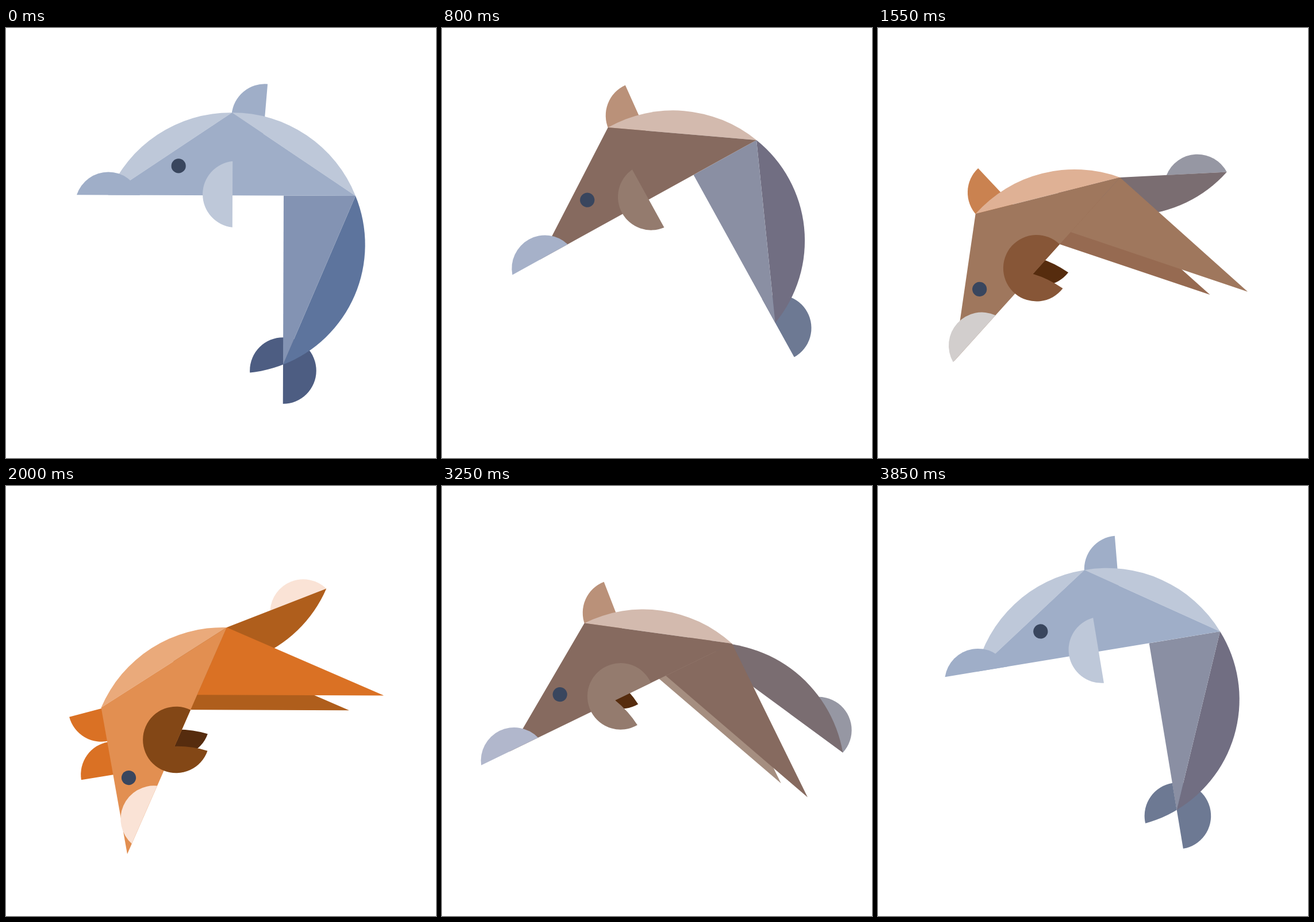
Recreate the animation shown at these times as an HTML page with a canvas. Size 748x748 px, loop 4000 ms.

```html
<!DOCTYPE html>
<html lang="en">
<head>
<meta charset="utf-8">
<title>Dolphin to fox</title>
<style>
  html, body { margin: 0; width: 100%; height: 100%; overflow: hidden; background: #fff; }
  canvas { display: block; }
</style>
</head>
<body>
<canvas id="stage" width="748" height="748"></canvas>
<script>
const ctx = document.getElementById('stage').getContext('2d');

// Body rotation in degrees and position of its rear corner, one per step.
const POSES = [
  [0.2, 608, 292], [-9.4, 595, 253], [-16, 578, 238], [-28.9, 547, 195],
  [-15.7, 519, 297], [-25.9, 504.5, 274], [-34.6, 482, 273], [-40, 477, 266.5],
  [-47.9, 421, 260], [-53.5, 410, 257], [-59.9, 402, 247], [-66.3, 384, 246]
];

// Colours at these steps; steps in between are mixed.
const KEYS = [0, 1, 3, 5, 8, 11];
const COLORS = {
  nose: '9faec8 9faec8 a6b1c9 b1b7cc d2cecd fae3d6',
  body: '9faec8 9faec8 866a5f 866a5f 9f775d e28f51',
  back: 'bec8d9 bec8d9 d3baae d3baae dfb195 eaaa7b',
  fin:  '9faec8 9faec8 ba9179 ba9179 ca8250 da7124',
  paw:  'bec8d9 bec8d9 947b6e 947b6e 875637 834716',
  stem: '8393b3 8a8fa3 8a8fa3 8a8fa3 8a8fa3 8a8fa3',
  leg:  '866a5f 866a5f 866a5f 866a5f 9f775d da7124',
  far:  'a58e80 a58e80 a58e80 a58e80 966a51 af5e1c',
  tail: '5d749d 716e82 716e82 7a6d71 7a6d71 af5e1c',
  tip:  '4d5d82 6d7993 6d7993 9697a3 9697a3 fae3d6'
};

const R = 57.8;
const RAD = Math.PI / 180;
const lerp = (a, b, u) => a + (b - a) * u;

function color(part, step) {
  const list = COLORS[part].split(' ');
  let i = 0;
  while (i < KEYS.length - 2 && step > KEYS[i + 1]) i++;
  const u = (step - KEYS[i]) / (KEYS[i + 1] - KEYS[i]);
  const channel = k => Math.round(lerp(
    parseInt(list[i].substr(k, 2), 16), parseInt(list[i + 1].substr(k, 2), 16), u));
  return `rgb(${channel(0)},${channel(2)},${channel(4)})`;
}

function fill(path, style) {
  ctx.fillStyle = style;
  ctx.fill(new Path2D(path));
}

function fillShifted(path, style, dx, dy) {
  ctx.save();
  ctx.translate(dx, dy);
  fill(path, style);
  ctx.restore();
}

// Half disc whose straight side points along deg.
function halfDisc(x, y, deg, clockwise, style) {
  ctx.fillStyle = style;
  ctx.beginPath();
  ctx.arc(x, y, R, deg * RAD, (deg + 180) * RAD, !clockwise);
  ctx.fill();
}

function disc(x, y, r, style) {
  ctx.fillStyle = style;
  ctx.beginPath();
  ctx.arc(x, y, r, 0, Math.PI * 2);
  ctx.fill();
}

const APEX = '-430.5 0';
const TOP = '-215.5 -144';
const LEG = 'M-128 0L0 0L1.5 298Z';
const PAW = `M-226 0A180 180 0 0 1 -210 55.6A${R} ${R} 0 1 1 -156.7 0Z`;
const FLIPPER = `M-214 -59.5A${R} ${R} 0 0 0 -214 55.5Z`;

function drawFins(step, style) {
  if (step < 10) {
    halfDisc(-158.3, -136.3, -85.3, false, style);
  } else {
    halfDisc(-216.7, -143, -128.5, false, style);
    halfDisc(-313.2, -76.6, -123, true, style);
  }
}

function drawFluke(step, tail, tip) {
  halfDisc(-125, 304.5, -90, true, tip);
  if (step < 3) {
    ctx.save();
    ctx.beginPath();
    ctx.arc(-207, 85.6, 224, 0, Math.PI * 2);
    ctx.clip();
    halfDisc(-125, 304.5, -90, false, tip);
    ctx.restore();
  }
  fill('M0 0A224 224 0 0 1 -125 294Z', tail);
  fill('M-125 0L0 0L-125 294Z', color('stem', step));
}

function drawBrush(step, tail, tip) {
  if (step < 6) {
    fill(`M36.9 153.4A${R} ${R} 0 1 1 90.5 255Z`, tip);
    fill('M-58.3 -27.2A230 230 0 0 1 90.5 255Z', tail);
  } else {
    fill(`M57.3 57.3A${R} ${R} 0 0 1 131.5 131.5Z`, tip);
    fill('M-94 -94A224 224 0 0 0 131.5 131.5Z', tail);
  }
}

function drawAnimal(step) {
  const [deg, x, y] = POSES[step];
  const swims = step < 4;
  const tint = part => color(part, step);

  ctx.setTransform(1, 0, 0, 1, 0, 0);
  ctx.fillStyle = '#fff';
  ctx.fillRect(0, 0, 748, 748);
  ctx.translate(x, y);
  ctx.rotate(deg * RAD);

  drawFins(step, tint('fin'));
  if (swims) {
    drawFluke(step, tint('tail'), tint('tip'));
  } else {
    drawBrush(step, tint('tail'), tint('tip'));
    const u = Math.min(1, Math.max(0, (step - 5) / 3));
    fillShifted(LEG, tint('far'), lerp(-31, -48, u), lerp(-42, -45, u));
    fillShifted(PAW, '#562c0e', lerp(17, 27, u), lerp(-32, -11.5, u));
    fill(LEG, tint('leg'));
  }

  if (step < 3) fill(`M${APEX}A230 230 0 0 1 ${TOP}Z`, tint('back'));
  fill(`M${TOP}A230 230 0 0 1 0 0Z`, tint('back'));
  fill(`M${APEX}L${TOP}L0 0Z`, tint('body'));

  const nose = step < 8 ? -430 : lerp(-378, -356, (step - 8) / 3);
  fill(`M${nose - 55} 0A${R} ${R} 0 0 1 ${nose + 55} 0Z`, tint('nose'));
  disc(-308, -51, 12.6, '#39465e');
  fill(swims ? FLIPPER : PAW, tint('paw'));
}

function stepAt(ms) {
  if (ms < 500) return 0;
  if (ms < 2000) return 1 + Math.floor((ms - 500) / 150);
  if (ms < 2500) return 11;
  return 10 - Math.floor((ms - 2500) / 150);
}

const start = performance.now();
function frame() {
  drawAnimal(stepAt((performance.now() - start) % 4000));
  requestAnimationFrame(frame);
}
frame();
</script>
</body>
</html>
```
